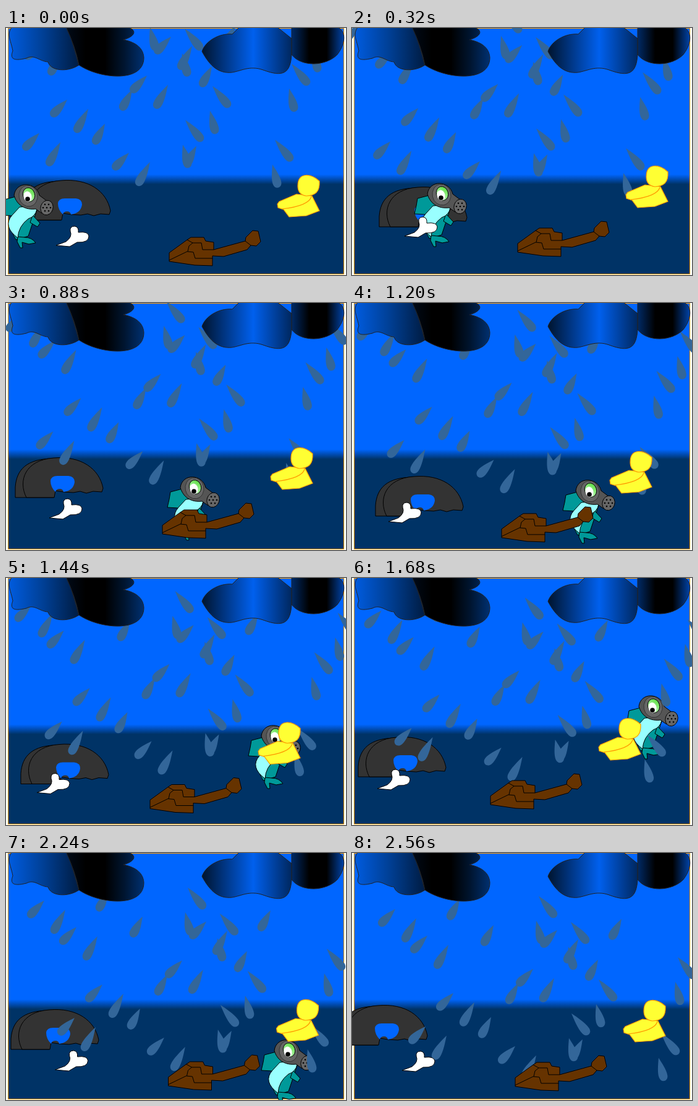
Write an HTML page with a canvas that moves like this. It is 550x400 px and loops after 2640 ms.

```html
<!DOCTYPE html>
<html lang="en">
<head>
<meta charset="utf-8">
<title>Rainy sea</title>
<style>
html, body { margin: 0; width: 100%; height: 100%; overflow: hidden; background: #fff; }
canvas { display: block; }
</style>
</head>
<body>
<canvas id="stage" width="550" height="400"></canvas>
<script>
const ctx = document.getElementById('stage').getContext('2d');
const STEP = 80, STEPS = 33;

const curve = d => new Path2D(d);

function oval(x, y, rx, ry = rx, tilt = 0) {
  const path = new Path2D();
  path.ellipse(x, y, rx, ry, tilt, 0, Math.PI * 2);
  return path;
}

function paint(path, fill, stroke, width = 1) {
  if (fill) { ctx.fillStyle = fill; ctx.fill(path); }
  if (stroke) { ctx.strokeStyle = stroke; ctx.lineWidth = width; ctx.stroke(path); }
}

function placed([x, y], draw) {
  ctx.save();
  ctx.translate(x, y);
  draw();
  ctx.restore();
}

// Evenly spaced colours along a line.
function fade(x0, y0, x1, y1, ...colors) {
  const g = ctx.createLinearGradient(x0, y0, x1, y1);
  colors.forEach((c, i) => g.addColorStop(i / (colors.length - 1), c));
  return g;
}

// Every mover changes direction on the same beats.
const BEATS = [0, 4, 11, 15, 21, 28, 32];
const tyreWay = [[27, 246], [44, 257], [15, 250], [38, 280], [10, 257], [8, 253], [-20, 246]];
const fishWay = [[36, 271], [145, 269], [305, 299], [385, 304], [487, 208], [457, 320], [448, 434]];
const driftWay = [[0, 0], [4, -15], [-11, -4], [-22, 2], [-40, -11], [-1.5, -1], [0, 0]];

function along(way, k) {
  const i = Math.max(1, BEATS.findIndex(b => b >= k));
  const u = (k - BEATS[i - 1]) / (BEATS[i] - BEATS[i - 1]);
  return way[i].map((to, axis) => way[i - 1][axis] * (1 - u) + to * u);
}

const water = fade(0, 237, 0, 253, '#0066ff', '#004cb3', '#003366');
function drawSea() {
  ctx.fillStyle = '#fff';
  ctx.fillRect(0, 0, 550, 400);
  ctx.fillStyle = water;
  ctx.fillRect(4, 0, 542, 399);
  ctx.strokeStyle = '#ff9900';
  ctx.lineWidth = 1;
  ctx.strokeRect(3.5, 0.5, 543, 398);
}

const tyre = {
  back: curve('M0 65V48C2 20 18 2 62 2V65Z'),
  front: curve('M18 65C4 38 16 4 62 1C106 -3 136 18 142 50L140 56L126 55L115 58L105 55L94 57L78 56L65 54L63 65Z'),
  hole: curve('M57 38Q58 30 68 30H86Q96 31 96 40Q94 54 78 56Q77 51 72 51Q66 51 65 56Q57 48 57 38Z')
};
function drawTyre() {
  paint(tyre.back, '#333', '#000');
  paint(tyre.front, '#333', '#000');
  paint(tyre.hole, '#0066ff');
}

const fish = {
  back: curve('M-20 2L-39 7L-41 19L-44 32L-27 33C-34 48 -26 60 -20 72L0 66L14 24Z'),
  belly: curve('M-14 19Q2 17 14 22Q12 34 0 38Q-16 50 -17 69Q-42 50 -26 32Z'),
  fin: curve('M7 32L19 45L15 51L3 44Z'),
  tail: curve('M-17 67L-18 75L-13 85H-9L-10 76L1 79L12 77Q6 68 -6 68Z'),
  mask: curve('M-23 0C-20 -24 13 -22 18 0L30 9L22 29L12 22C-4 24 -18 17 -23 0Z'),
  ring: oval(0, 1, 15, 17, -0.2),
  iris: oval(1, -1, 9.5, 11.5, -0.3),
  white: oval(-1, 2, 6.5, 8.5, -0.2),
  pupil: oval(-1, 6, 3.8),
  snout: oval(30, 20, 10, 12, 0.3)
};
const holes = new Path2D();
for (let i = 0; i < 7; i++) {
  const r = i ? 6 : 0, a = i * Math.PI / 3;
  holes.addPath(oval(30 + r * Math.cos(a), 20 + r * Math.sin(a), 1.3));
}
const glow = fade(-4, 8, 7, -8, '#ccffcc', '#66e04d');
function drawFish() {
  for (const part of ['back', 'tail', 'fin']) paint(fish[part], '#009999', '#000');
  paint(fish.belly, '#99ffff', '#000');
  paint(fish.mask, '#555', '#000');
  paint(fish.ring, '#666', '#333');
  paint(fish.iris, glow, '#000');
  paint(fish.white, '#fff');
  paint(fish.pupil, '#000');
  paint(fish.snout, '#666', '#000');
  paint(holes, '#000');
}

// Rain is stamped in small clusters: each cluster repeats the same drops.
// A drop is its head (offset from the anchor) and the vector to its tail.
const rain = [
  { drops: [{ head: [0, 0], tail: [25, -26] }, { head: [39, 26], tail: [20, -37] }],
    anchors: [[-20, 6], [32, 49], [203, 103], [74, 142], [29, 196], [174, 228], [242, 40]] },
  { drops: [{ head: [0, 0], tail: [-27, -33] }, { head: [-22, 43], tail: [-9, -36] }],
    anchors: [[264, -8], [316, 34], [361, 127], [317, 182], [489, 91], [462, 214], [527, 27]] },
  { drops: [{ head: [0, 0], tail: [17, -32] }],
    anchors: [[92, -4], [147, 38], [354, 28], [316, 94], [143, 187], [187, 132], [291, 223]] }
];

function dropShape([dx, dy]) {
  const len = Math.hypot(dx, dy);
  const drop = curve(`M0 ${-len}C3 ${-len * 0.75} 8 ${-len * 0.4} 7 -6C6 4 -6 4 -7 -6C-8 ${-len * 0.4} -3 ${-len * 0.75} 0 ${-len}Z`);
  const turned = new Path2D();
  turned.addPath(drop, new DOMMatrix().rotate(Math.atan2(dx, -dy) * 180 / Math.PI));
  return turned;
}

const shower = new Path2D();
for (const { drops, anchors } of rain) {
  for (const { head, tail } of drops) {
    const shape = dropShape(tail);
    for (const [x, y] of anchors) {
      shower.addPath(shape, new DOMMatrix().translate(x + head[0], y + head[1]));
    }
  }
}

const bone = curve('M81 352L97 346Q108 338 104 329Q103 321 111 321Q118 322 117 331Q133 329 134 337Q134 348 115 347L103 354Z');
const wood = curve('M264 364L293 343L299 339H320L323 345L336 347V359L387 345L388 339L399 328L408 329L412 346L405 353L396 352L390 359L352 370L334 369V385L305 384L264 378Z');
const grain = curve('M264 376L293 362L303 363L306 373H334M293 343L302 348L296 353L294 362M302 348H316L318 359H336M387 345L396 352');
const duck = {
  body: curve('M439 285L442 281L470 269L495 272L507 296L486 304L458 306L449 294L440 291Z'),
  fold: curve('M447 293Q490 288 494 273'),
  head: curve('M472 256C472 232 494 236 507 248C508 266 500 271 486 272Q472 270 472 256Z')
};
function drawDrift() {
  paint(bone, '#fff', '#000');
  paint(wood, '#663300', '#000');
  paint(grain, null, '#000');
  for (const part of ['body', 'fold', 'head']) {
    paint(duck[part], part === 'fold' ? null : '#ffff33', '#ff9900', 1.2);
  }
}

const clouds = [
  {
    path: curve('M100 -2H10C0 10 8 20 11 37C6 50 12 54 33 49C46 42 54 54 68 55C72 70 100 72 118 60Z'),
    fill: fade(4, 0, 118, 0, '#005ce0', '#003f94', '#001c42')
  },
  {
    path: curve('M97 -2Q112 30 118 60C150 82 223 90 223 48C222 30 206 22 190 19C208 14 214 4 196 -2Z'),
    fill: fade(97, 0, 223, 0, '#000a18', '#000', '#000', '#001530', '#003070')
  },
  {
    path: curve('M462 43V-2H536C554 8 546 30 536 43C518 62 478 64 462 43Z'),
    fill: fade(462, 0, 547, 0, '#002a66', '#000', '#000', '#0044aa')
  },
  {
    path: curve('M317 38C322 22 344 8 366 10L378 -2H438L462 17V43C460 74 448 80 416 68C394 60 380 70 365 72C344 74 330 62 317 38Z'),
    fill: fade(317, 0, 483, 0, '#00142e', '#0060ee', '#00142e')
  }
];

function render(k) {
  drawSea();
  placed(along(tyreWay, k), drawTyre);
  placed(along(fishWay, k), drawFish);
  placed([k * 2.03, k * 3.46], () => paint(shower, '#336699'));
  placed(along(driftWay, k), drawDrift);
  clouds.forEach(c => paint(c.path, c.fill, '#222'));
}

const start = performance.now();
function tick() {
  render(Math.floor((performance.now() - start) / STEP) % STEPS);
  requestAnimationFrame(tick);
}
tick();
</script>
</body>
</html>
```
